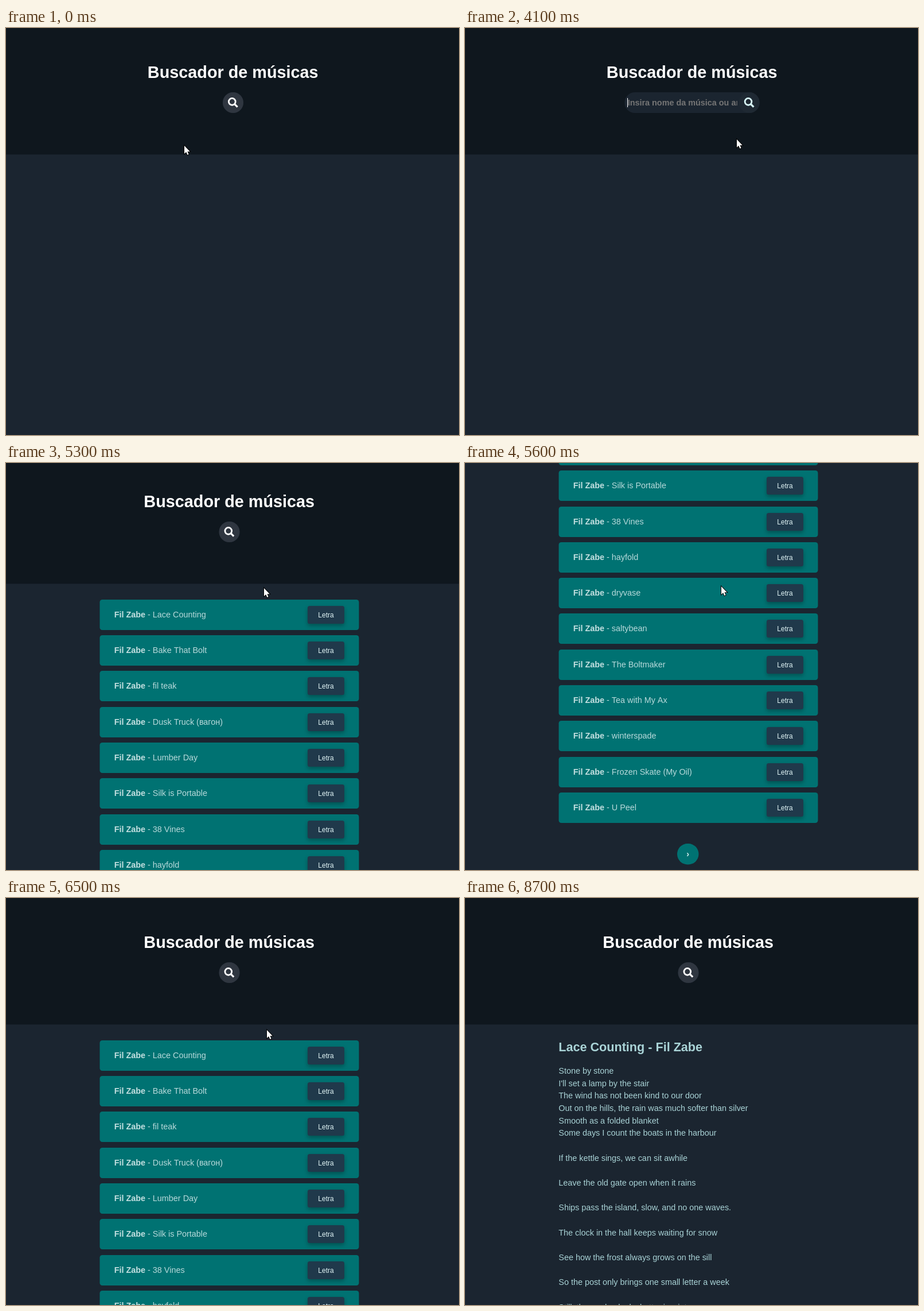
These frames come from a looping animation (790x709 px, 9 s). An HTML page with a canvas:

```html
<!DOCTYPE html>
<html lang="pt">
<head>
<meta charset="utf-8">
<title>Buscador de músicas</title>
<style>
html, body { margin: 0; width: 100%; height: 100%; overflow: hidden; background: #1b2530; }
canvas { display: block; }
</style>
</head>
<body>
<canvas id="stage" width="790" height="709"></canvas>
<script>
const ctx = document.getElementById('stage').getContext('2d');
const W = 790, H = 709, LOOP = 9000, STEP = 100;
const SANS = '"Liberation Sans", Arial, sans-serif';
const BODY = '14.4px ' + SANS, BOLD = 'bold ' + BODY;

const HEADER = '#0f171e', PAGE = '#1b2530', TEAL = '#007272', PALE = '#a9d3d6';
const BUTTON_RGB = [47, 54, 64], PAGE_RGB = [27, 37, 48];
const WHITE_RGB = [255, 255, 255], CYAN_RGB = [207, 246, 248];

const ARTIST = 'Fil Zabe';
const SONGS = ['Lace Counting', 'Bake That Bolt', 'fil teak', 'Dusk Truck (вагон)',
  'Lumber Day', 'Silk is Portable', '38 Vines', 'hayfold', 'dryvase', 'saltybean',
  'The Boltmaker', 'Tea with My Ax', 'winterspade', 'Frozen Skate (My Oil)', 'U Peel'];
const LYRICS = [
  'Stone by stone',
  "I'll set a lamp by the stair",
  'The wind has not been kind to our door',
  'Out on the hills, the rain was much softer than silver',
  'Smooth as a folded blanket',
  'Some days I count the boats in the harbour', '',
  'If the kettle sings, we can sit awhile', '',
  'Leave the old gate open when it rains', '',
  'Ships pass the island, slow, and no one waves.', '',
  'The clock in the hall keeps waiting for snow', '',
  'See how the frost always grows on the sill', '',
  'So the post only brings one small letter a week', '',
  'Still, the garden looks better in winter'];
const QUERY = ARTIST.toLowerCase();
const KEY_TIMES = [1600, 1800, 2000, 2100, 2200, 2300, 2400, 2500];

const OPEN_AT = 450, CLOSE_AT = 4035, FADE = 400;
const SUBMIT_AT = 3700, RESULTS_AT = 4600, LYRICS_AT = 7600;

// [time, x, y]
const POINTER = [
  [0, 311, 205], [300, 358, 172], [500, 388, 140], [1000, 404, 137], [1200, 405, 139],
  [2900, 405, 139], [3300, 470, 124], [3700, 522, 131], [3900, 518, 131], [4000, 496, 165],
  [4100, 474, 194], [4500, 453, 220], [4900, 451, 217], [5100, 450, 218], [5300, 450, 218],
  [5600, 447, 215], [6100, 447, 215], [6500, 455, 230], [7000, 543, 279], [7200, 547, 283],
  [7600, 547, 283], [8000, 464, 219], [8100, 464, 219], [8600, 40, 2], [8700, 20, -40], [9000, 20, -40]];
// [time, offset]
const SCROLL = [[0, 0], [5200, 0], [5300, 10], [5400, 190], [5500, 420], [5600, 546],
  [6000, 546], [6100, 500], [6300, 100], [6400, 0], [9000, 0]];

const clamp = v => Math.min(1, Math.max(0, v));
const mix = (a, b, p) => `rgb(${a.map((v, i) => Math.round(v + (b[i] - v) * p))})`;

function track(keys, t, k = 1) {
  const i = Math.max(1, keys.findIndex(key => key[0] >= t));
  const a = keys[i - 1], b = keys[i];
  return a[k] + (b[k] - a[k]) * (t - a[0]) / (b[0] - a[0]);
}

// The CSS "ease" curve
function ease(x) {
  x = clamp(x);
  let lo = 0, hi = 1;
  for (let i = 0; i < 20; i++) {
    const s = (lo + hi) / 2, r = 1 - s;
    if (.75 * s * r * r + .75 * s * s * r + s ** 3 < x) lo = s; else hi = s;
  }
  const r = 1 - lo;
  return .3 * lo * r * r + 3 * lo * lo * r + lo ** 3;
}

function box(x, y, w, h, radius, fill) {
  ctx.fillStyle = fill;
  ctx.beginPath();
  ctx.roundRect(x, y, w, h, radius);
  ctx.fill();
}

function text(str, x, y, font, fill, align = 'left') {
  ctx.font = font;
  ctx.fillStyle = fill;
  ctx.textAlign = align;
  ctx.fillText(str, x, y);
}

function polygon(points) {
  ctx.beginPath();
  points.forEach(([x, y]) => ctx.lineTo(x, y));
  ctx.closePath();
}

function magnifier(x, y, color) {
  ctx.save();
  ctx.translate(x - 9, y - 9);
  ctx.scale(18 / 512, 18 / 512);
  ctx.strokeStyle = color;
  ctx.lineWidth = 80;
  ctx.beginPath();
  ctx.arc(208, 208, 168, 0, 7);
  ctx.stroke();
  ctx.lineWidth = 92;
  ctx.beginPath();
  ctx.moveTo(325, 325);
  ctx.lineTo(475, 475);
  ctx.stroke();
  ctx.restore();
}

function searchBar(t, cx) {
  const p = t < CLOSE_AT ? ease((t - OPEN_AT) / FADE) : 1 - ease((t - CLOSE_AT) / FADE);
  const width = 36 + 253 * p;
  const left = cx - width / 2, btn = left + width - 36;
  box(left, 112, width, 36, 18, PAGE);
  box(btn, 112, 36, 36, 18, mix(BUTTON_RGB, PAGE_RGB, p));

  if (p > 0) {
    const x = left + 5.4;
    const typed = t < SUBMIT_AT ? QUERY.slice(0, KEY_TIMES.filter(k => k <= t).length) : '';
    ctx.save();
    ctx.beginPath();
    ctx.rect(x - 1, 112, Math.max(0, btn - 2 - x), 36);
    ctx.clip();
    text(typed || 'Insira nome da música ou artista', x, 135, BOLD, typed ? '#cdeff1' : '#757575');
    const caretOn = t >= 1100 && !(t >= 3000 && t < 3500);
    if (caretOn) {
      ctx.fillStyle = '#fff';
      ctx.fillRect(Math.floor(x + (typed && ctx.measureText(typed).width)), 122, 1, 16);
    }
    ctx.restore();
  }
  magnifier(btn + 18, 130, mix(WHITE_RGB, CYAN_RGB, p));
  return { left, btn, right: left + width };
}

function songList() {
  SONGS.forEach((song, i) => {
    const y = Math.round(247.7 + 62.3 * i), base = y + 31;
    box(163.5, y, 452, 53, 4.5, TEAL);
    text(ARTIST, 188.7, base, BOLD, '#c3dfe0');
    const end = 188.7 + ctx.measureText(ARTIST).width;
    text(' - ' + song, end, base, BODY, '#b9dadb');
    ctx.save();
    ctx.shadowColor = 'rgba(0,0,0,.3)';
    ctx.shadowBlur = 7;
    ctx.shadowOffsetY = 3;
    box(526, y + 11, 64, 31, 3.6, '#20394b');
    ctx.restore();
    text('Letra', 558, y + 31, '12px ' + SANS, '#e2f6f7', 'center');
  });
  box(370, 1209, 37.5, 36.5, 18.2, TEAL);
  text('›', 388.7, 1232, BOLD, '#d5eeee', 'center');
}

function lyrics() {
  text(`${SONGS[0]} - ${ARTIST}`, 163.3, 267, 'bold 21.6px ' + SANS, PALE);
  LYRICS.forEach((line, i) => text(line, 163.3, Math.round(306 + 21.67 * i), BODY, PALE));
}

function arrow() {
  polygon([[0, 0], [0, 14], [3.2, 11], [5.4, 16], [7.6, 15], [5.5, 10.2], [9.8, 10.2]]);
  ctx.strokeStyle = '#000';
  ctx.lineWidth = 1.8;
  ctx.stroke();
  ctx.fillStyle = '#fff';
  ctx.fill();
}

function textBeam() {
  for (const [color, width] of [['#000', 2.6], ['#dde3e6', 1]]) {
    ctx.strokeStyle = color;
    ctx.lineWidth = width;
    ctx.beginPath();
    for (const y of [-5.5, 6.5]) {
      ctx.moveTo(-3, y);
      ctx.lineTo(3, y);
    }
    ctx.moveTo(0, -5.5);
    ctx.lineTo(0, 6.5);
    ctx.stroke();
  }
}

function hand() {
  polygon([[-1.5, 0], [0, -1], [1.5, 0], [1.5, 5], [7, 6.2], [8, 8], [7.5, 12], [6, 15],
    [-1, 15], [-5, 9.5], [-4.5, 8], [-3, 8], [-1.5, 9.5]]);
  ctx.lineJoin = 'round';
  ctx.strokeStyle = '#000';
  ctx.lineWidth = 1.8;
  ctx.stroke();
  ctx.fillStyle = '#fff';
  ctx.fill();
}

function pointer(t, bar) {
  const x = Math.round(track(POINTER, t)), y = Math.round(track(POINTER, t, 2));
  const inBar = y > 112 && y < 148 && x > bar.left && x < bar.right;
  const onLetra = t > 6500 && t < LYRICS_AT && x > 526 && y > 258;
  ctx.save();
  ctx.translate(x, y);
  if (inBar && x < bar.btn) textBeam();
  else if (inBar || onLetra) hand();
  else arrow();
  ctx.restore();
}

function draw(t) {
  const cx = t < RESULTS_AT ? 396 : 389.5;
  ctx.fillStyle = PAGE;
  ctx.fillRect(0, 0, W, H);
  ctx.save();
  ctx.translate(0, -Math.round(track(SCROLL, t)));
  ctx.fillStyle = HEADER;
  ctx.fillRect(0, 0, W, 220.4);
  text('Buscador de músicas', cx - .3, 87, 'bold 28.8px ' + SANS, '#fff', 'center');
  const bar = searchBar(t, cx);
  if (t >= LYRICS_AT) lyrics();
  else if (t >= RESULTS_AT) songList();
  ctx.restore();
  pointer(t, bar);
}

const start = performance.now();
function tick() {
  const t = (performance.now() - start) % LOOP;
  draw(Math.floor(t / STEP) * STEP);
  requestAnimationFrame(tick);
}
tick();
</script>
</body>
</html>
```
